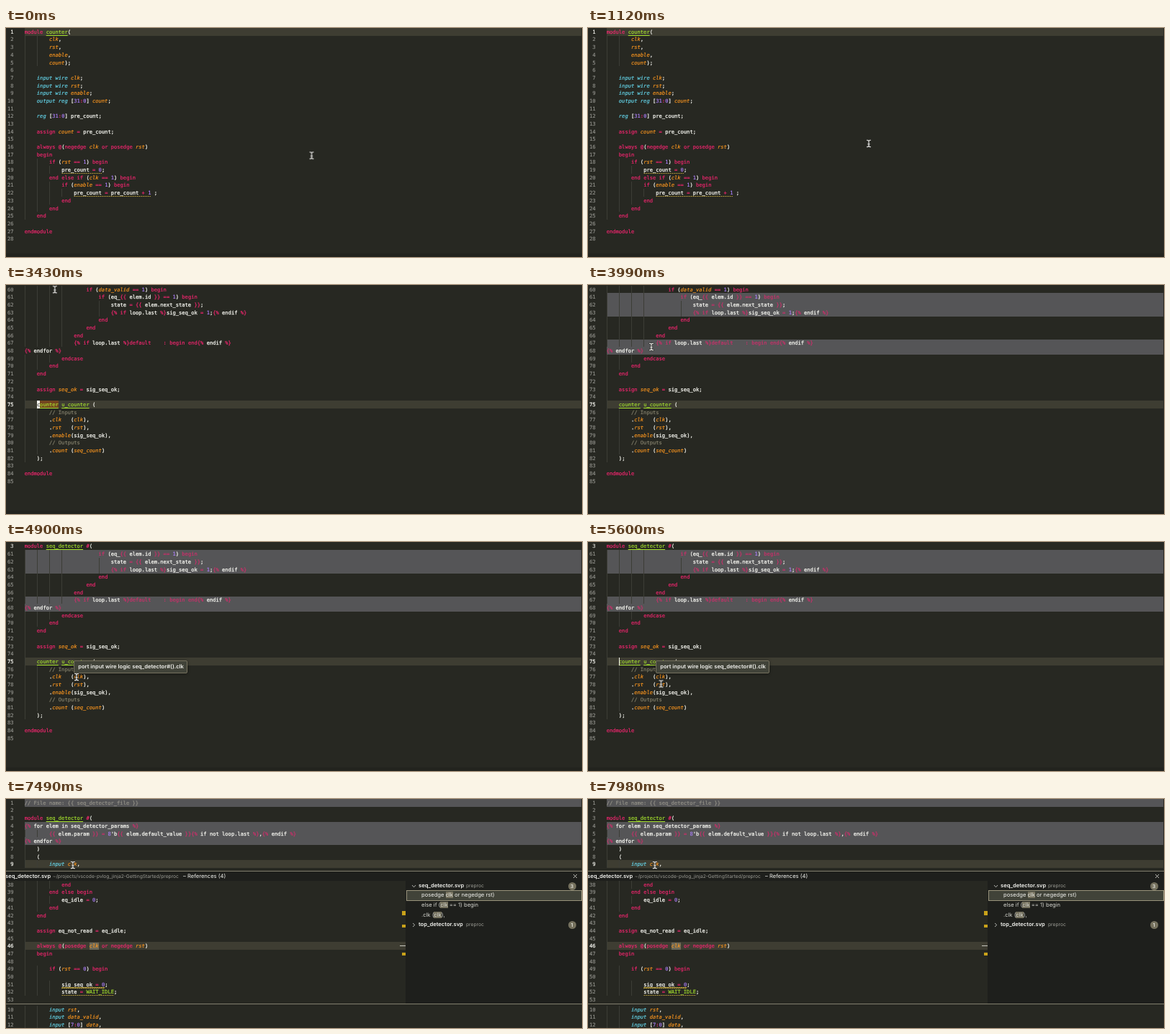
Animation of 800 by 319 pixels, one loop 8 s. Source, as an HTML page:

```html
<!DOCTYPE html>
<html lang="en">
<head>
<meta charset="utf-8">
<title>Editor navigation</title>
<style>
html, body { margin: 0; width: 100%; height: 100%; overflow: hidden; background: #272822; }
#stage { position: relative; width: 800px; height: 319px; overflow: hidden; background: #272822; text-rendering: geometricPrecision; }
#stage div, #stage i, #stage svg { position: absolute; }
.view { inset: 0; overflow: hidden; }
.row { left: 0; width: 800px; height: 10.685px; font: 7.12px/10.685px "DejaVu Sans Mono", "Liberation Mono", monospace; white-space: pre; color: #f8f8f2; -webkit-text-stroke: .15px; }
.row i { font-style: normal; top: .8px; }
.row .n { right: 789.4px; color: #94948e; }
.row .n.on { color: #e8e8e2; }
.row .w { -webkit-text-stroke: .25px; }
.row .k { color: #f92672; }
.row .t { color: #66d9ef; font-style: italic; }
.row .p { color: #fd971f; font-style: italic; }
.row .d { color: #ae81ff; }
.row .c { color: #88846f; }
.row .m { color: #a6e22e; }
.row .u { text-decoration: underline .7px; text-underline-offset: 1.5px; text-decoration-skip-ink: none; }
.row.dim .k { color: #d42d6c; }
.row.dim .c { color: #96948a; }
.guide { top: 0; left: 25.7px; height: 10.7px; background: repeating-linear-gradient(90deg, #3c3d36 0 .7px, transparent .7px 17.148px); }
.active { left: 42.6px; width: .8px; background: #6a6b64; }
.squig { top: 9.2px; height: 1.5px; background: linear-gradient(135deg, transparent 35%, #b0983a 35% 65%, transparent 65%) 0 0 / 3px 1.5px, linear-gradient(45deg, transparent 35%, #b0983a 35% 65%, transparent 65%) 1.5px 0 / 3px 1.5px; }
.hit { top: .4px; height: 10px; background: #6b6858; }
.band { left: 26px; width: 773px; }
.gray { background: #555557; }
.line { background: #3e3d32; }
.foot { left: 0; top: 314px; width: 800px; height: 5px; background: #22231e; }
.ui { font: 7.6px/12px Inter, "Open Sans", sans-serif; white-space: pre; color: #d4d4ce; }
.ui.strong { font-weight: 600; color: #f2f2ee; }
.ui.small { font-size: 6.7px; color: #9c9c95; }
.ui b { font-weight: 400; background: #75715e; }
.badge { width: 11px; height: 11px; border-radius: 50%; background: #75715e; color: #f8f8f2; font: 500 7px/11px Inter, sans-serif; text-align: center; }
.tip { left: 94px; top: 164.5px; width: 156px; height: 16px; background: #414339; border: .8px solid #75715e; border-radius: 2px; box-shadow: 0 1px 4px #0006; }
.mark { background: #c9a21a; }

.anim { animation: 8s step-end infinite; }
@keyframes first { 0% { opacity: 1 } 37.625%, 100% { opacity: 0 } }
@keyframes second { 0% { opacity: 0 } 37.625% { opacity: 1 } 73.5%, 100% { opacity: 0 } }
@keyframes third { 0% { opacity: 0 } 73.5%, 100% { opacity: 1 } }
@keyframes flash { 0% { opacity: 1 } 44.25%, 100% { opacity: 0 } }
@keyframes shade { 0% { opacity: 0 } 45.5%, 100% { opacity: 1 } }
@keyframes fade { 0% { color: #f92672 } 45.5%, 100% { color: #d42d6c } }
@keyframes blink { 0% { opacity: 0 } 50.875% { opacity: 1 } 57.5% { opacity: 0 } 64.125% { opacity: 1 } 70.75%, 100% { opacity: 0 } }
@keyframes sticky { 0% { opacity: 0 } 56%, 100% { opacity: 1 } }
@keyframes tip { 0% { opacity: 0 } 60.375% { opacity: 1 } 71.25%, 100% { opacity: 0 } }
@keyframes before { 0% { opacity: 1 } 88.375%, 100% { opacity: 0 } }
@keyframes after { 0% { opacity: 0 } 88.375%, 100% { opacity: 1 } }
@keyframes peek { 0% { opacity: 0 } 90.125%, 100% { opacity: 1 } }
.late.dim .k { animation: fade 8s step-end infinite; }

#mouse { left: -4px; top: -6px; animation: move 8s ease-in-out infinite; }
@keyframes move {
  0%, 11.375% { transform: translate(424.5px, 177.5px) }
  23.5%, 43.75% { transform: translate(67.8px, 6.2px) }
  49.875% { transform: translate(88px, 86px) }
  57%, 66% { transform: translate(98px, 188px) }
  69.5%, 80.5% { transform: translate(101.5px, 197.5px) }
  86.625%, 100% { transform: translate(92.8px, 92px) }
}
</style>
</head>
<body>
<div id="stage"></div>
<script>
const CW = 4.287, LH = 10.685, X = 25.7;
const stage = document.getElementById('stage');
const words = s => new Set(s.split(' '));
const KEYS = words('module endmodule assign always begin end if else or posedge negedge endcase default for');
const TYPES = words('input output wire reg logic');
const PORTS = words('clk rst enable count data_valid data seq_ok seq_count');
const NAMES = words('counter u_counter seq_detector state_1');

function add(parent, cls, style = {}, html = '', tag = 'div') {
  const el = document.createElement(tag);
  el.className = cls;
  for (const key in style) {
    const v = style[key];
    el.style[key] = typeof v === 'number' ? v + 'px' : v;
  }
  el.innerHTML = html;
  parent.append(el);
  return el;
}

const timed = (el, name) => {
  el.classList.add('anim');
  el.style.animationName = name;
  return el;
};

function kind(tok) {
  if (tok.startsWith('//')) return 'c';
  if (KEYS.has(tok) || /^(\{[{%]|[%}]\}|[=+?:@#]+)$/.test(tok)) return 'k';
  if (TYPES.has(tok)) return 't';
  if (PORTS.has(tok)) return 'p';
  if (NAMES.has(tok)) return 'm u';
  if (tok === 'WAIT_IDLE') return 'm';
  return /^\d/.test(tok) ? 'd' : 'w';
}

// Marks in code: «» squiggle, ‹› highlighted word, ~ plain word.
function codeRow(parent, top, num, src, opt = {}) {
  const row = add(parent, 'row ' + (opt.cls || ''), { top });
  if (opt.indent) add(row, 'guide', { width: opt.indent * CW });
  add(row, opt.on ? 'n on' : 'n', {}, num, 'i');
  let col = 0, from = 0;
  for (const tok of src.match(/\/\/.*|\{[{%]|[%}]\}|\d+|~?[A-Za-z_]\w*|[=+?:@#]+|\s+|./g) || []) {
    if ('«‹'.includes(tok)) from = col;
    else if ('»›'.includes(tok)) {
      const box = { left: X + from * CW, width: (col - from) * CW };
      if (tok === '»') add(row, 'squig', box);
      else {
        const hit = add(row, 'hit', box);
        row.prepend(hit);
        if (opt.hit) timed(hit, opt.hit);
      }
    } else {
      const text = tok.replace('~', '');
      const cls = tok.startsWith('~') ? 'w' : kind(tok);
      if (text.trim()) add(row, cls, { left: X + col * CW }, '', 'i').textContent = text;
      col += text.length;
    }
  }
}

function code(parent, top, first, src, opt = {}) {
  const lines = src.split('\n');
  const depth = s => s && s.trim() ? s.search(/\S/) : null;
  const gray = opt.gray || [];
  for (const [start, count] of gray) {
    const band = add(parent, 'band gray', { top: top + (start - first) * LH, height: count * LH });
    if (opt.late) timed(band, 'shade');
  }
  for (const [num, name] of opt.current || []) {
    const band = add(parent, 'band line', { top: top + (num - first) * LH, height: LH });
    if (name) timed(band, name);
  }
  lines.forEach((line, i) => {
    const num = first + i;
    const inGray = gray.some(([s, n]) => num >= s && num < s + n);
    const indent = depth(line) ?? Math.min(depth(lines[i - 1]) || 0, depth(lines[i + 1]) || 0);
    codeRow(parent, top + i * LH, num, line, {
      indent, hit: opt.hit,
      cls: inGray ? (opt.late ? 'dim late' : 'dim') : ''
    });
  });
  for (const [num, name] of opt.current || []) {
    const row = add(parent, 'row', { top: top + (num - first) * LH });
    add(row, 'n on', {}, num, 'i');
    if (name) timed(row, name);
  }
}

const ui = (parent, x, y, html, cls = '', style = {}) =>
  add(parent, 'ui ' + cls, { left: x, top: y - 6, ...style }, html);

const view = name => timed(add(stage, 'view'), name);

// Counter module
const a = view('first');
add(a, 'foot');
code(a, 0, 1, `module counter(
        clk,
        rst,
        enable,
        count);

    input wire clk;
    input wire rst;
    input wire enable;
    output reg [31:0] count;

    reg [31:0] pre_count;

    assign count = pre_count;

    always @(negedge clk or posedge rst)
    begin
        if (rst == 1) begin
            «pre_count = 0»;
        end else if (clk == 1) begin
            if (enable == 1) begin
                «pre_count = pre_count + 1» ;
            end
        end
    end

endmodule
`, { current: [[1]] });

// Detector, lower part
const b = view('second'), topB = .8, row75 = topB + 15 * LH;
add(b, 'foot');
add(b, 'band line', { top: row75, height: LH });
timed(add(b, '', { left: 43, top: row75, width: 30, height: LH, background: '#74451f' }), 'flash');
add(b, 'active', { top: row75 + LH, height: 6 * LH });
code(b, topB, 60, `                    if (data_valid == 1) begin
                        if (eq_{{ elem.id }} == 1) begin
                            state = {{ elem.next_state }};
                            {% if loop.last %}sig_seq_ok = 1;{% endif %}
                        end
                    end
                end
                {% if loop.last %}default    : begin end{% endif %}
{% endfor %}
            endcase
        end
    end

    assign seq_ok = sig_seq_ok;

    counter u_counter (
        // Inputs
        .clk   (clk),
        .rst   (rst),
        .enable(sig_seq_ok),
        // Outputs
        .count (seq_count)
    );

endmodule
`, { gray: [[61, 3], [67, 2]], late: true });
const num75 = add(b, 'row', { top: row75 });
add(num75, 'n on', {}, 75, 'i');
timed(add(b, 'row', { top: row75, left: 43, width: 4.2, background: '#f8f8f0', color: '#444' }, '<i>c</i>'), 'flash');
timed(add(b, '', { left: 42.6, top: row75, width: 1, height: LH, background: '#f8f8f0' }), 'blink');
const head = timed(add(b, '', { left: 0, top: 0, width: 800, height: 11.4, background: '#272822' }), 'sticky');
codeRow(head, 0, 3, 'module seq_detector #(', { on: true });
const tip = timed(add(b, 'tip'), 'tip');
ui(tip, 5.2, 8, 'port input wire logic seq_detector#().clk', 'strong');

// Detector, upper part
const c = view('third');
add(c, 'active', { top: 8 * LH, height: 6 * LH });
code(c, 0, 1, `// File name: {{ seq_detector_file }}

module seq_detector #(
{% ~for elem in seq_detector_params %}
        {{ elem.param }} = 8'b{{ elem.default_value }}{% ~if not loop.last %},{% endif %}
{% endfor %}
    )
    (
        input clk,
        input ‹rst›,
        input data_valid,
        input [7:0] data,
        output seq_ok,
        output [31:0] seq_count
    );

    state_1 state;
{% for elem in seq_detector_params %}
    logic eq_{{ elem.id }};
{% endfor %}

    logic «eq_not_used»;
    logic «eq_not_read»;
    logic «eq_not_written»;

    logic sig_seq_ok;

{% for key in seq_detector_keys %}
    assign eq_{{ key.id }} = ~data == {{ key.param }} ? 1 : 0;
{% endfor %}`, {
  gray: [[1, 1], [4, 3], [18, 3], [28, 3]],
  current: [[10, 'before'], [9, 'after']],
  hit: 'before'
});

// References peek
const LINE = '#827f6e';
const peek = timed(add(c, '', { left: 0, top: 0, width: 800, height: 319, clipPath: 'inset(96.2px 0 0 0)' }), 'peek');
add(peek, '', { left: 0, top: 96.2, width: 800, height: 223, background: '#272822' });
code(peek, 288, 10, `        input rst,
        input data_valid,
        input [7:0] data,`);
add(peek, '', { left: 0, top: 100, width: 800, height: 13.5, background: '#1e1f1c' });
code(peek, 114, 38, `            end
        end else begin
            eq_idle = 0;
        end
    end

    assign eq_not_read = eq_idle;

    always @(posedge ‹clk› or negedge rst)
    begin

        if (rst == 0) begin

            «sig_seq_ok = 0»;
            «state = WAIT_IDLE»;
`, { current: [[46]] });
for (const [y, h] of [[156, 6], [174.5, 4], [214, 4]]) add(peek, 'mark', { left: 550, top: y, width: 4.5, height: h });
add(peek, '', { left: 547, top: 203.5, width: 8, height: 1.4, background: '#c8c8c0' });
add(peek, '', { left: 555, top: 113.5, width: 245, height: 172, background: '#1e1f1c' });
for (const y of [100, 285]) add(peek, '', { left: 0, top: y, width: 800, height: 1, background: LINE });

ui(peek, -1, 107.6, 'seq_detector.svp', 'strong', { fontWeight: 500 });
ui(peek, 65, 107.8, '~/projects/vscode-pvlog_jinja2-GettingStarted/preproc', 'small');
ui(peek, 246, 107.6, '– References (4)', '', { color: '#f2f2ee' });
add(peek, '', { left: 787, top: 103.5, width: 7, height: 7 },
  '<svg width="7" height="7" stroke="#d4d4ce" stroke-width=".9"><path d="M1 1L6 6M6 1L1 6"/></svg>');

const group = (y, name, count, arrow) => {
  add(peek, '', { left: 562.5, top: y - 3.5, width: 7, height: 7 },
    `<svg width="7" height="7" fill="none" stroke="#c5c5c0" stroke-width=".9"><path d="${arrow}"/></svg>`);
  ui(peek, 573, y, name, 'strong', { fontWeight: 500 });
  ui(peek, 639, y, 'preproc', 'small');
  add(peek, 'badge', { left: 780.5, top: y - 5.5 }, count);
};
group(121, 'seq_detector.svp', 3, 'M1 2L3.5 4.8L6 2');
group(175.3, 'top_detector.svp', 1, 'M2 1L4.8 3.5L2 6');
add(peek, '', { left: 555.5, top: 127.4, width: 242, height: 12.4, background: '#414339', border: '1px solid #99947c' });
ui(peek, 577, 134.3, 'posedge <b>clk</b> or negedge rst)', '', { color: '#f2f2ee' });
ui(peek, 577, 148, 'else if (<b>clk</b> == 1) begin');
ui(peek, 577, 161.6, '.clk (<b>clk</b>),');

// Mouse pointer
const beam = (color, width) => `<path stroke="${color}" stroke-width="${width}" d="M1.5 1.3Q4 1.3 4 3V9Q4 10.7 1.5 10.7M6.5 1.3Q4 1.3 4 3V9Q4 10.7 6.5 10.7M2.8 6.8H5.2"/>`;
add(stage, '', {}, `<svg width="8" height="12" fill="none" stroke-linecap="round">${beam('#1c1c1a', 2.2)}${beam('#e6e6e2', 1.2)}</svg>`).id = 'mouse';
</script>
</body>
</html>
```
